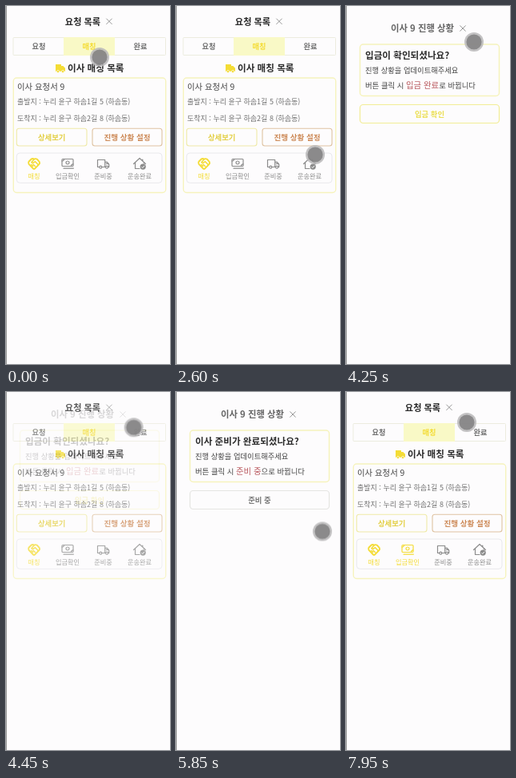
An HTML page for the animation above (8 s loop, 205 by 448 pixels).

```html
<!DOCTYPE html>
<html lang="ko">
<head>
<meta charset="utf-8">
<title>이사 매칭</title>
<style>
  html, body { margin: 0; width: 100%; height: 100%; overflow: hidden; background: #fdfcfd; }
  svg { display: block; width: 100vw; height: 100vh; }
  text { font-family: "Noto Sans CJK KR", "Noto Sans CJK", "Noto Sans", sans-serif; white-space: pre; }
  .line { fill: none; stroke: currentColor; stroke-width: 1.2; stroke-linejoin: round; stroke-linecap: round; }
</style>
</head>
<body>
<svg id="stage" viewBox="0 0 205 448">
  <defs>
    <g id="match" class="line">
      <path stroke-width="1.9" d="M-6.5-2.8L-3-6.2Q-1.5-7 0-5.8Q2-7 3.8-5.8L6.8-2.4Q7.6-.8 6.3.6L1 6Q0 6.9-1 6L-6.4.4Q-7.4-1.2-6.5-2.8Z"/>
      <path stroke-width="1.6" d="M0-5.5L-3-2Q-2-.2 0-1.8L1.5-2.8L5 .8M-3.4 1.2L-1.4 3M-1 .8L1.4 3"/>
    </g>
    <g id="money" class="line">
      <rect x="-7" y="-6" width="14" height="9" rx="1"/>
      <circle cy="-1.5" r="2"/>
      <path d="M-7-3.4Q-4.4-3.4-4.4-6M7 .4Q4.4 .4 4.4 3M-5 5.6H7.4"/>
    </g>
    <g id="truck" class="line">
      <path d="M-4.8 4H-7V-5H2.2V4H-1.6M2.2-2.2H5L7.2 .8V4H6.2M2.2 4H3M3.8-.2H7"/>
      <circle cx="-3.2" cy="4.2" r="1.5"/><circle cx="4.6" cy="4.2" r="1.5"/>
    </g>
    <g id="home">
      <path class="line" d="M-7.5 0L0-7L7.5 0M-5.5-1.5V6H0M5.5-1.5V-.5M3.8-5.5V-3.8"/>
      <circle cx="4.2" cy="3.6" r="3.6" fill="currentColor"/>
      <path d="M2.5 3.7L3.8 5L6 2.4" fill="none" stroke="#fff"/>
    </g>
  </defs>
</svg>
<script>
const LOOP = 8000;
const YELLOW = '#f4dc35', GRAY = '#8c8c8c', PALE = '#f6f3bd', BG = '#fdfcfd';
const stage = document.getElementById('stage');

function add(parent, tag, attrs = {}) {
  const el = document.createElementNS('http://www.w3.org/2000/svg', tag);
  for (const key in attrs) el.setAttribute(key, attrs[key]);
  return parent.appendChild(el);
}

// y is the vertical middle of the line
function label(parent, str, x, y, size, fill, attrs = {}) {
  const el = add(parent, 'text', { x, y: y + size * 0.38, 'font-size': size, fill, ...attrs });
  el.textContent = str;
  return el;
}
const BOLD = { 'font-weight': 700 }, MID = { 'text-anchor': 'middle' }, BOTH = { ...BOLD, ...MID };

function box(parent, x, y, right, bottom, stroke, rx = 4, width = 1.2) {
  return add(parent, 'rect', { x, y, width: right - x, height: bottom - y, rx, stroke, 'stroke-width': width, fill: BG });
}

function closeMark(parent, x, y) {
  add(parent, 'path', { d: `M${x - 3.6} ${y - 3.6}l7.2 7.2m0-7.2l-7.2 7.2`, stroke: '#999', fill: 'none' });
}

// steps: [time, keyframe properties]
function play(el, steps, easing = 'linear') {
  const frames = steps.map(([time, props]) => ({ offset: time / LOOP, easing, ...props }));
  el.animate(frames, { duration: LOOP, iterations: Infinity });
}

function switchAt(el, prop, time, before, after) {
  play(el, [[0, { [prop]: before }], [time, { [prop]: before }], [time, { [prop]: after }], [LOOP, { [prop]: after }]]);
}

function fade(el, start, shown, leave, gone) {
  play(el, [[0, 0], [start, 0], [shown, 1], [leave, 1], [gone, 0], [LOOP, 0]].map(([t, opacity]) => [t, { opacity }]));
}

function buildList() {
  const g = add(stage, 'g');
  label(g, '요청 목록', 96, 19.7, 11.2, '#2c2c2c', BOTH);
  closeMark(g, 129, 19.3);

  box(g, 9, 39.5, 199.5, 61.5, '#ececdf', 1, 1);
  add(g, 'rect', { x: 72, y: 39, width: 64, height: 23, fill: '#f9f9c6' });
  [['요청', 41, '#707070'], ['매칭', 104, YELLOW], ['완료', 168, '#707070']]
    .forEach(([str, x, color]) => label(g, str, x, 50.7, 9.2, color, BOTH));

  add(g, 'path', { d: 'M62 73h7v2h2.3l2.7 2.8v4H62Z', fill: YELLOW });
  [65, 71].forEach(cx => add(g, 'circle', { cx, cy: 82, r: 1.6, fill: YELLOW, stroke: BG, 'stroke-width': .6 }));
  label(g, '이사 매칭 목록', 77, 77.5, 11.6, '#2c2c2c', BOLD);

  box(g, 9.3, 90, 199.7, 233.5, PALE, 4, 1.4);
  label(g, '이사 요청서 9', 14, 101.3, 10.4, '#444', { 'font-weight': 500 });
  label(g, '출발지 : 누리 윤구 하솜1길 5 (하솜동)', 14, 119.5, 9, '#707070');
  label(g, '도착지 : 누리 윤구 하솜2길 8 (하솜동)', 14, 141, 9, '#707070');

  box(g, 13.3, 153.3, 101, 175, '#efeaa8', 3, 1.1);
  label(g, '상세보기', 57.2, 164.5, 9.4, '#e3cf45', BOTH);
  box(g, 108, 153.3, 195, 175, '#dfc3a2', 3, 1.1);
  label(g, '진행 상황 설정', 151.5, 164.5, 9.5, '#cd8a58', BOTH);

  box(g, 13.3, 184, 195, 221.3, '#e9e9ec', 4, 1);
  const stages = [['match', '매칭', 35], ['money', '입금확인', 77], ['truck', '준비중', 121.5], ['home', '운송완료', 167]];
  stages.forEach(([icon, name, x], i) => {
    const item = add(g, 'g', { color: i ? GRAY : YELLOW });
    add(item, 'use', { href: '#' + icon, transform: `translate(${x} 197.5)` });
    label(item, name, x, 212.5, 8.2, 'currentColor', { ...MID, 'font-weight': 500 });
    if (i === 1) switchAt(item, 'color', 4800, GRAY, YELLOW);
  });
}

function buildDialog({ question, status, particle, button, times, pressed }) {
  const g = add(stage, 'g', { opacity: 0 });
  add(g, 'rect', { width: 205, height: 448, fill: BG });
  label(g, '이사 9 진행 상황', 95.5, 28, 11.4, '#666', BOTH);
  closeMark(g, 146, 28);

  box(g, 17.5, 48, 191.5, 112.5, PALE, 4, 1.5);
  label(g, question, 24, 62, 11.6, '#2c2c2c', BOLD);
  label(g, '진행 상황을 업데이트해주세요', 24, 80.5, 9.3, '#444');
  const line = label(g, '버튼 클릭 시 ', 24, 99, 9.4, '#444');
  add(line, 'tspan', { fill: '#b9595e', 'font-size': 10.4 }).textContent = status;
  add(line, 'tspan').textContent = particle + ' 바뀝니다';

  const frame = box(g, 17.5, 123.5, 191.5, 146.5, '#e5e5e2', 4);
  const caption = label(g, button, 104.5, 135, 9.4, '#777', BOTH);
  switchAt(frame, 'stroke', pressed, '#e5e5e2', '#f2ed95');
  switchAt(caption, 'fill', pressed, '#777', '#ebde52');
  fade(g, ...times);
}

function buildPointer() {
  const g = add(stage, 'g', { opacity: .95 });
  add(g, 'circle', { r: 12, fill: '#b9b8b9', opacity: .9 });
  add(g, 'circle', { r: 9.6, fill: '#858485' });
  const path = [
    [0, 117, 64], [50, 117, 64], [300, 125, 110], [1600, 125, 110], [1900, 143, 150],
    [2150, 143, 150], [2250, 160, 172], [2400, 160, 172], [2450, 174, 186], [3100, 174, 186],
    [3250, 152, 166], [3650, 151, 165], [3850, 127, 149], [3900, 127, 149], [4050, 160, 48],
    [4250, 160, 45], [4750, 159, 43], [5050, 186, 176], [5800, 186, 176], [6050, 150, 158],
    [6350, 150, 158], [6600, 126, 148], [6800, 126, 148], [6950, 162, 104], [7150, 160, 46],
    [7600, 158, 41], [7950, 151, 38], [LOOP, 151, 38],
  ];
  play(g, path.map(([t, x, y]) => [t, { transform: `translate(${x}px, ${y}px)` }]), 'ease-in-out');
}

buildList();
buildDialog({
  question: '입금이 확인되셨나요?', status: '입금 완료', particle: '로', button: '입금 확인',
  times: [2700, 2900, 4300, 4500], pressed: 3850,
});
buildDialog({
  question: '이사 준비가 완료되셨나요?', status: '준비 중', particle: '으로', button: '준비 중',
  times: [5350, 5550, 7400, 7600], pressed: 6600,
});
add(stage, 'rect', { width: 1, height: 448, fill: '#999' });
buildPointer();
</script>
</body>
</html>
```
